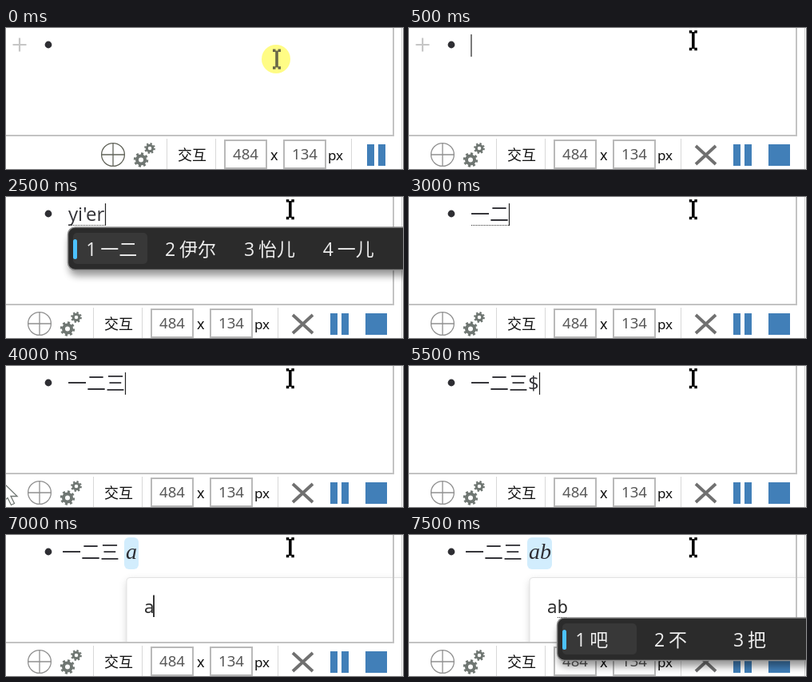
Recreate the animation shown at these times as an HTML page. Size 497 by 177 pixels, loop 8000 ms.

```html
<!DOCTYPE html>
<html lang="zh">
<head>
<meta charset="utf-8">
<style>
html, body { margin: 0; width: 100%; height: 100%; overflow: hidden; background: #fff; }
svg { display: block; width: 497px; height: 177px; }
text { font-family: "Noto Sans", "Noto Sans CJK SC", sans-serif; white-space: pre; }
.doc { font: 24px "Open Sans", "Noto Sans CJK SC", sans-serif; fill: #333338; }
.code { font: 22px "Noto Sans Mono", monospace; }
.math { font: italic 28px "Liberation Serif", serif; fill: #2e2e33; }
.ime { font: 23px "Open Sans", "Noto Sans CJK SC", sans-serif; fill: #eee; }
.bar { font-size: 18px; fill: #111; }
.num { font-size: 18.6px; fill: #585858; text-anchor: middle; }
.dots { stroke: #333; stroke-dasharray: 1 1; }
.icon { fill: none; stroke: #6f7672; }
</style>
</head>
<body>
<svg viewBox="0 0 497 177">
  <defs>
    <clipPath id="page"><rect width="497" height="135"/></clipPath>
    <filter id="soft" x="-10%" y="-40%" width="120%" height="180%"><feGaussianBlur stdDeviation="5"/></filter>
    <g id="beam" fill="none" stroke-width="3.6"><path d="M-5 1.8H-1.5M1.5 1.8H5M-5 23.5H-1.5M1.5 23.5H5M0 2V23"/></g>
    <g id="gear" class="icon">
      <circle r="5" stroke-width="4"/>
      <circle r="7.8" stroke-width="2.8" pathLength="16" stroke-dasharray="1"/>
    </g>
  </defs>
  <rect width="497" height="177" fill="#fff"/>

  <g clip-path="url(#page)">
    <path id="plus" d="M8.5 21H25.5M17 12.5V29.5" stroke="#c6c6c6" stroke-width="2.2"/>
    <circle cx="53" cy="21" r="4.4" fill="#2e2e33"/>
    <rect id="chip" rx="6"/>
    <text id="line" class="doc" y="30"></text>
    <text id="math" class="math" x="150" y="30"></text>
    <path id="lineDots" class="dots"/>
    <path id="caret" stroke="#222" stroke-width="1.2"/>
    <g id="editor">
      <rect x="151" y="57" width="400" height="110" rx="5" fill="#777" opacity=".32" filter="url(#soft)"/>
      <rect x="151" y="53.5" width="400" height="110" rx="4" fill="#fff" stroke="#e2e2e2"/>
      <text id="code" class="code" x="172.5" y="97.5"></text>
      <path id="codeDots" class="dots"/>
      <path id="codeCaret" stroke="#222" stroke-width="1.8"/>
    </g>
  </g>

  <path d="M0 135H485V0" fill="none" stroke="#c3c3c3" stroke-width="2"/>
  <path d="M495.5 0V177" stroke="#cfcfcf"/>

  <g id="tools">
    <path id="arrow" class="icon" d="M-2 148L14 163.5H6L10.5 172.5L6.5 174.5L2 165.5L-2 169" stroke-width="1.3"/>
    <g id="target" fill="none" stroke-width="1.3"><circle cx="42" cy="159" r="14.4"/><path d="M27.6 159H56.4M42 144.6V173.4"/></g>
    <use href="#gear" x="77" y="165.5"/>
    <use href="#gear" transform="translate(88 151) scale(.75)"/>
    <path d="M109.5 139V177M170.5 139V177M340.5 139V177" stroke="#d8d8d8"/>
    <text class="bar" x="123" y="166">交互</text>
    <g fill="#fff" stroke="#b9b9b9" stroke-width="2"><rect x="182" y="141" width="52" height="35"/><rect x="256" y="141" width="52" height="35"/></g>
    <text class="num" x="208" y="164.5">484</text>
    <text class="num" x="282" y="164.5">134</text>
    <text class="bar" x="239" y="166">x</text>
    <text class="bar" x="311" y="166" style="font-size:17px">px</text>
  </g>
  <path id="cancel" d="M359 148L384 171M384 148L359 171" stroke="#707070" stroke-width="3.8"/>
  <path id="pause" d="M406 146h9v27h-9zM420 146h9v27h-9z" fill="#417fb8"/>
  <rect id="stop" x="450" y="146" width="27" height="27" fill="#417fb8"/>

  <g id="panel">
    <rect x="79" y="46" width="480" height="53" rx="10" fill="#000" opacity=".4" filter="url(#soft)"/>
    <rect x="77.5" y="38" width="480" height="53.5" rx="9" fill="#2b2b2b" stroke="#8c8c8c" stroke-width="1.5"/>
    <rect x="84" y="45" width="93" height="39" rx="5" fill="#383838"/>
    <rect x="84" y="53" width="5" height="25" rx="2.5" fill="#4cc2ff"/>
    <g id="words" class="ime"></g>
  </g>

  <circle id="halo" cx="338" cy="39" r="18" fill="#fffc85"/>
  <use id="mouse" href="#beam"/>
</svg>
<script>
const $ = id => document.getElementById(id);
const set = (id, attrs) => { for (const k in attrs) $(id).setAttribute(k, attrs[k]); };
const show = (id, on) => { $(id).style.display = on ? '' : 'none'; };

const TYPED = 78, HAN = 77;
const idle = { line: '', x: TYPED };
const formula = { line: '一二三', x: 70, chip: [148, 3, 18, 40, '#d2edfd'], math: 'a', code: 'a' };
const yi = ['一', '以', '已', '亿'];

// [start ms, state]
const steps = [
  [0, { ...idle, idle: true, plus: true }],
  [500, { ...idle, plus: true, caret: 78 }],
  [1000, { line: 'y', x: TYPED, dots: [78, 90], caret: 90.5, words: ['以', '一', '意', '已'] }],
  [1500, { line: 'yi', x: TYPED, dots: [78, 96], caret: 96.5, words: yi }],
  [2000, { line: "yi'e", x: TYPED, dots: [78, 115], caret: 115.5, words: yi }],
  [2500, { line: "yi'er", x: TYPED, dots: [78, 124], caret: 124.5, words: ['一二', '伊尔', '怡儿', '一儿'] }],
  [3000, { line: '一二', x: HAN, dots: [78, 125], caret: 125.5 }],
  [3500, { line: '一二三', x: HAN, caret: 149.5 }],
  [4000, { line: '一二三', x: HAN, caret: 149.5, arrow: true }],
  [5000, { line: '一二三$', x: HAN, caret: 163.5, arrow: true }],
  [5500, { line: '一二三$', x: HAN, caret: 163.5 }],
  [6000, { line: '一二三', x: HAN, hint: 'New equation', chip: [150, 1, 169, 41, '#e7e7f1'], code: 'Type LaTeX code', codeCaret: 173 }],
  [6500, { ...formula, codeDots: [173, 185], codeCaret: 185 }],
  [7000, { ...formula, codeCaret: 185 }],
  [7500, { ...formula, chip: [148, 3, 31, 40, '#d2edfd'], math: 'ab', code: 'ab', codeDots: [186, 198], words: ['吧', '不', '把'], panelAt: [108, 66] }]
];

function rule(id, span, y) {
  show(id, span);
  if (span) set(id, { d: `M${span[0]} ${y}H${span[1]}` });
}

function bar(id, x, top, bottom) {
  show(id, x);
  if (x) set(id, { d: `M${x} ${top}V${bottom}` });
}

function draw(s) {
  const on = !s.idle;
  for (const id of ['cancel', 'stop']) show(id, on);
  show('halo', s.idle);
  show('plus', s.plus);
  show('arrow', s.arrow);
  set('tools', { transform: `translate(${on ? 0 : 92})` });
  set('target', { stroke: on ? '#909090' : '#62645a' });
  set('pause', { transform: `translate(${on ? 0 : 46})` });
  set('mouse', { transform: on ? 'translate(355.8 3)' : 'translate(339 26.5)', stroke: on ? '#000' : '#6a6848' });

  $('line').innerHTML = s.line + (s.hint ? `<tspan x="155.5">${s.hint}</tspan>` : '');
  set('line', { x: s.x });
  rule('lineDots', s.dots, 35.5);
  bar('caret', s.caret, 8, 36);
  $('math').textContent = s.math || '';
  show('chip', s.chip);
  if (s.chip) {
    const [x, y, width, height, fill] = s.chip;
    set('chip', { x, y, width, height, fill });
  }

  show('editor', s.code);
  $('code').textContent = s.code || '';
  set('code', { fill: s.hint ? '#757575' : '#2b2b2b' });
  rule('codeDots', s.codeDots, 103.5);
  bar('codeCaret', s.codeCaret, 75.5, 103);

  show('panel', s.words);
  set('panel', { transform: `translate(${s.panelAt || [0, 0]})` });
  $('words').innerHTML = (s.words || []).map((w, i) => {
    const x = 100.3 + 98.8 * i;
    return `<text class="ime" x="${x}" y="73.5">${i + 1}</text><text class="ime" x="${x + 18}" y="73.5">${w}</text>`;
  }).join('');
}

let current;
function tick(now) {
  const t = now % 8000;
  const step = steps.findLast(([start]) => start <= t);
  if (step !== current) draw((current = step)[1]);
  requestAnimationFrame(tick);
}
tick(0);
</script>
</body>
</html>
```
